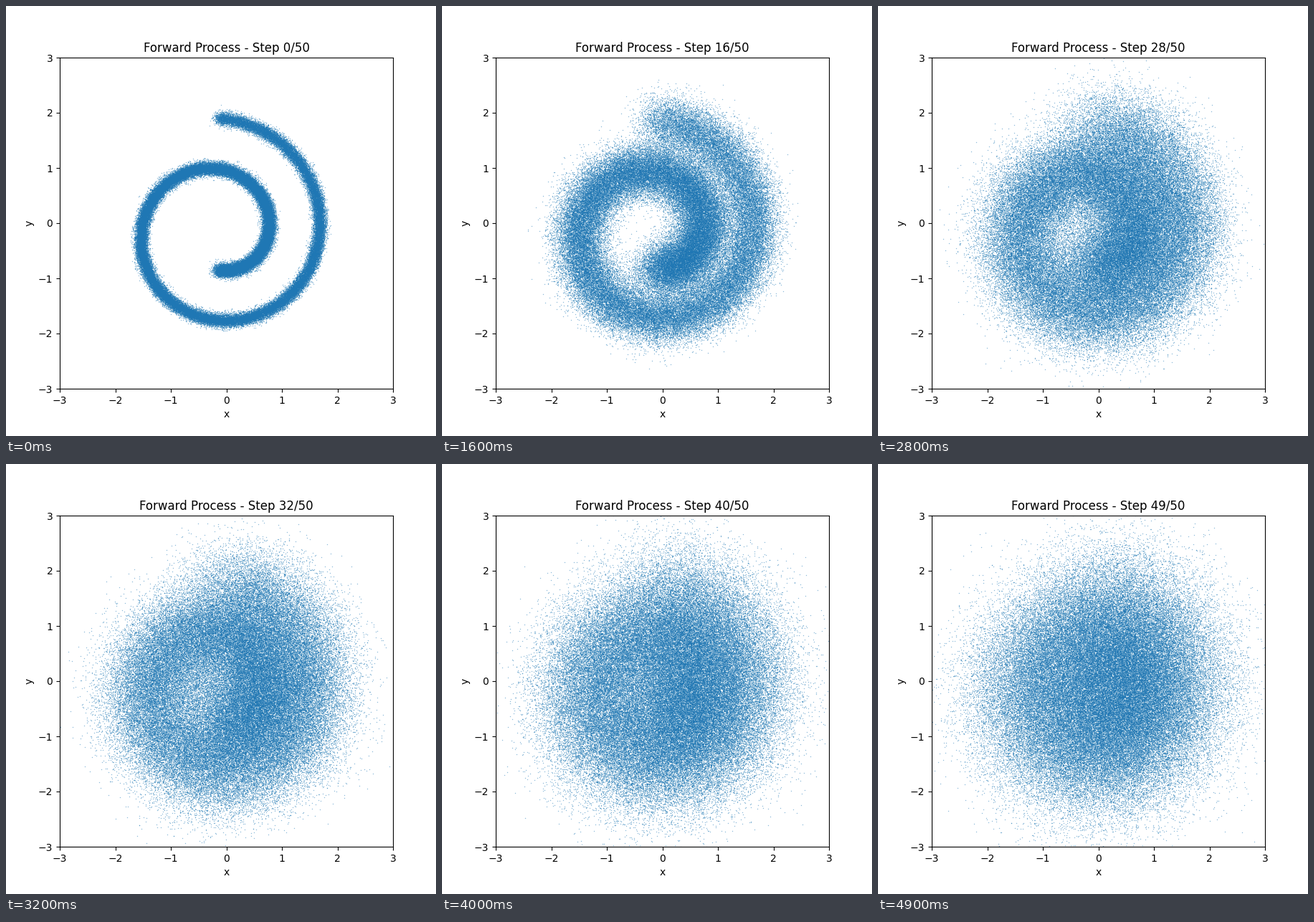
A matplotlib script that plays this animation: 600x600 px, repeating every 5 s.

```python
import numpy as np
import matplotlib.pyplot as plt
from matplotlib.animation import FuncAnimation

STEPS = 50
POINTS = 100_000
ROLL_NOISE = 0.4


def spiral():
    """Noisy swiss roll, normalised by its overall mean and deviation."""
    rng = np.random.default_rng(0)
    t = 1.5 * np.pi * (1 + 2 * rng.random(POINTS))
    roll = np.column_stack([t * np.cos(t), t * np.sin(t)])
    roll += ROLL_NOISE * rng.standard_normal(roll.shape)
    return (roll - roll.mean()) / roll.std()


clean = spiral()
signal = np.cumprod(1 - np.linspace(1e-4, 0.02, STEPS))


def diffuse(step):
    noise = np.random.default_rng(100 + step).standard_normal(clean.shape)
    return np.sqrt(signal[step]) * clean + np.sqrt(1 - signal[step]) * noise


fig, ax = plt.subplots(figsize=(6, 6), dpi=100)
cloud = ax.scatter(clean[:, 0], clean[:, 1], s=1, alpha=0.5, color="C0", linewidths=0)
ax.set(xlim=(-3, 3), ylim=(-3, 3), xlabel="x", ylabel="y")
title = ax.set_title("")


def update(step):
    cloud.set_offsets(diffuse(step))
    title.set_text(f"Forward Process - Step {step}/{STEPS}")
    return cloud, title


anim = FuncAnimation(fig, update, frames=STEPS, interval=100, repeat=True, repeat_delay=0)
plt.show()
```
